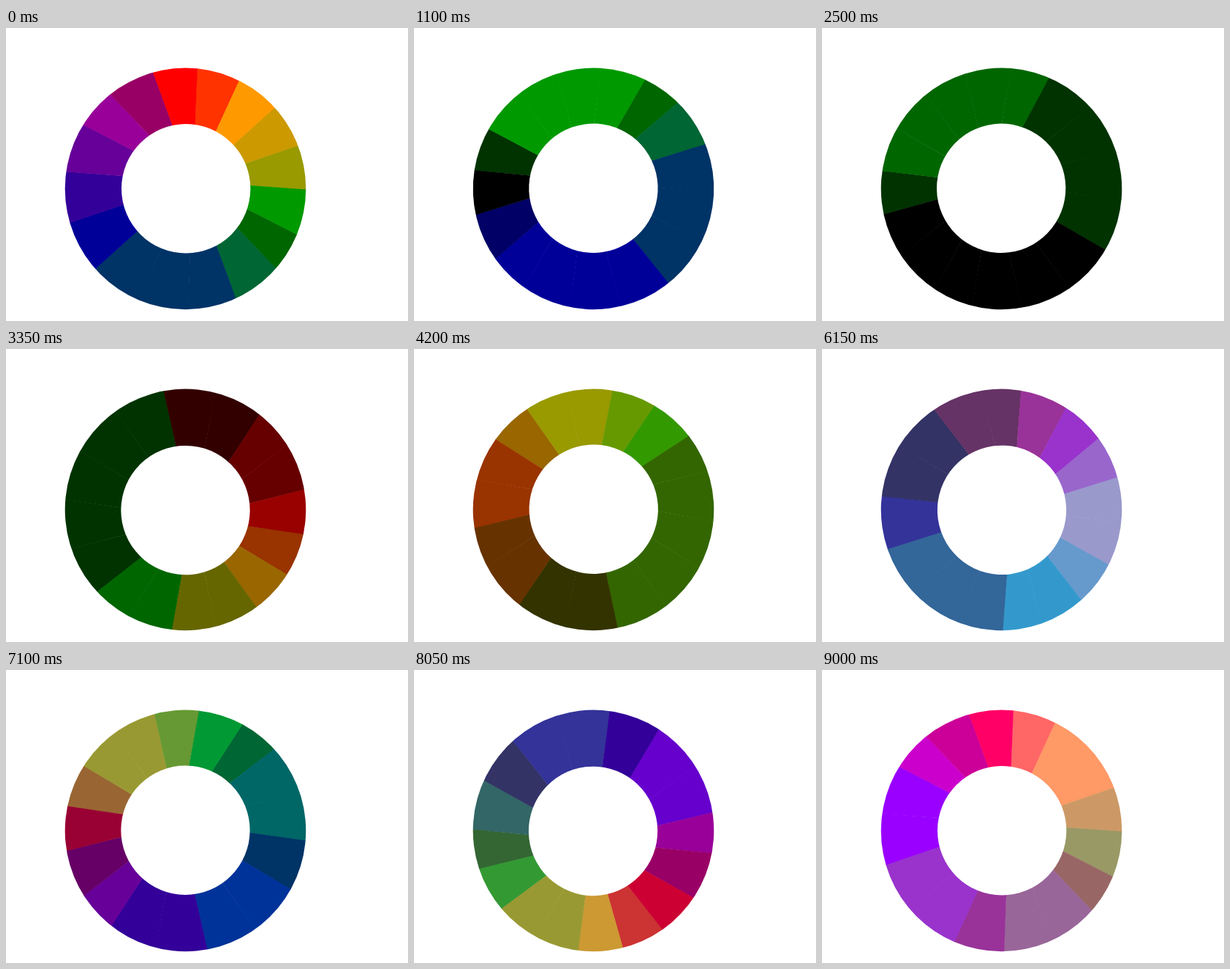
These frames come from a looping animation (550 px wide and 400 px high, 9050 ms). An HTML page with a canvas:

```html
<!DOCTYPE html>
<html lang="en">
<head>
<meta charset="utf-8">
<title>Colour wheel</title>
<style>
  html, body { margin: 0; width: 100%; height: 100%; overflow: hidden; background: #fff; }
  canvas { display: block; width: 550px; height: 400px; }
</style>
</head>
<body>
<canvas id="stage" width="550" height="400"></canvas>
<script>
const ctx = document.getElementById('stage').getContext('2d');
const STEP = 50, FRAMES = 181;
const CENTER = [245.5, 219.4], HUB = [10.2, -10.2], HOLE = [0.7, -0.1];
const OUTER = 164.8, INNER = 88.2;

// Eight lines cross at the off-centre hub; degrees clockwise from the top.
const LINES = [2.3, 24.9, 48.3, 71.5, 94.4, 117.3, 136.5, 160];
const EDGES = [...LINES, ...LINES.map(a => a + 180), 362.3];

const SECTORS = [
  [255, 72, 0], [255, 150, 0], [210, 150, 0], [145, 150, 0],
  [0, 150, 0], [0, 119, 0], [0, 112, 72], [0, 72, 90],
  [0, 55, 95], [0, 41, 121], [0, 22, 140], [60, 0, 165],
  [95, 0, 165], [165, 0, 140], [177, 0, 90], [255, 0, 0]
];

// One full turn between neighbouring keys; each channel is [multiplier, offset].
const KEYS = [
  { at: 0,   tint: [[1, 0], [1, 0], [1, 0]] },
  { at: 29,  tint: [[-1, 0], [1, 0], [1, 0]] },
  { at: 59,  tint: [[0.45, 0], [0.5, 0], [-1, 0]] },
  { at: 89,  tint: [[0.45, 58], [0.62, 63], [-1, 25]] },
  { at: 119, tint: [[0.45, 52], [0.77, 39], [-1, 255]] },
  { at: 149, tint: [[0.65, -9], [1, 0], [1, 7]] },
  { at: 180, tint: [[0.5, 128], [1, 5], [0.8, 100]] }
];

const mix = (a, b, u) => a + (b - a) * u;
const radians = deg => deg * Math.PI / 180;
const webSafe = v => Math.round(Math.max(0, Math.min(255, v)) / 51) * 51;

function pose(frame) {
  let i = 0;
  while (i < KEYS.length - 2 && frame >= KEYS[i + 1].at) i++;
  const from = KEYS[i], to = KEYS[i + 1];
  const u = (frame - from.at) / (to.at - from.at);
  const tint = from.tint.map(([m, o], c) =>
    [mix(m, to.tint[c][0], u), mix(o, to.tint[c][1], u)]);
  return { turn: radians(360 * u), tint };
}

function disc(x, y, r) {
  ctx.beginPath();
  ctx.arc(x, y, r, 0, 2 * Math.PI);
}

function draw(frame) {
  const { turn, tint } = pose(frame);
  ctx.fillStyle = '#fff';
  ctx.fillRect(0, 0, 550, 400);
  ctx.save();
  ctx.translate(...CENTER);
  ctx.rotate(turn);

  ctx.save();
  disc(0, 0, OUTER);
  ctx.clip();
  SECTORS.forEach((color, i) => {
    const rgb = color.map((v, c) => webSafe(v * tint[c][0] + tint[c][1]));
    ctx.fillStyle = `rgb(${rgb})`;
    ctx.beginPath();
    ctx.moveTo(...HUB);
    // A slight overlap hides the seams.
    ctx.arc(...HUB, 200, radians(EDGES[i] - 90.2), radians(EDGES[i + 1] - 90));
    ctx.fill();
  });
  ctx.restore();

  ctx.fillStyle = '#fff';
  disc(...HOLE, INNER);
  ctx.fill();
  ctx.restore();
}

function tick() {
  draw(Math.floor(performance.now() / STEP) % FRAMES);
  requestAnimationFrame(tick);
}
tick();
</script>
</body>
</html>
```
